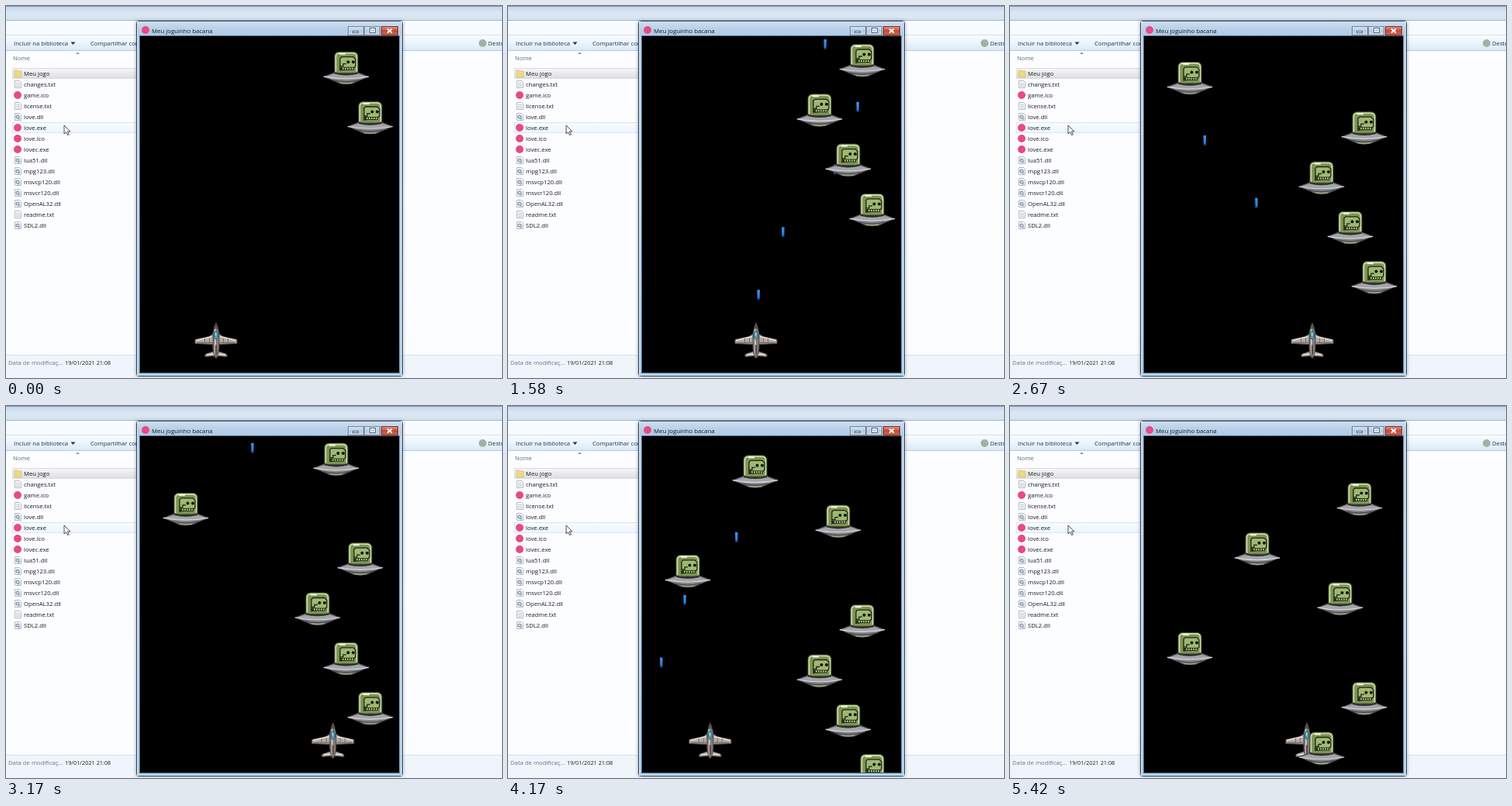
Animation of 640x480 px, one loop 5.51 s. Source, as an HTML page with a canvas:

```html
<!DOCTYPE html>
<html lang="pt">
<head>
<meta charset="utf-8">
<title>Meu joguinho bacana</title>
<style>
html, body { margin: 0; width: 100%; height: 100%; overflow: hidden; background: #fcfdff; }
canvas { display: block; }
</style>
</head>
<body>
<canvas id="stage" width="640" height="480"></canvas>
<script>
const c = document.getElementById('stage').getContext('2d');
const LOOP = 5510;
const PLANE_SPEED = .33, BULLET_SPEED = .4, SAUCER_SPEED = .08; // px per ms
const COOLDOWN = 202, SAUCER_GAP = 64.3;

// [time, x to steer for]
const STEER = [[0, 227], [133, 448], [989, 320], [1627, 210], [1960, 390], [2670, 440], [3115, 180], [3925, 383]];
// [time of first shot, shots]
const BURSTS = [[675, 5], [2075, 2], [3565, 5]];
const SAUCERS = [470, 439, 402, 457, 232, 426, 319, 451];
const FILES = ['Meu jogo', 'changes.txt', 'game.ico', 'license.txt', 'love.dll', 'love.exe', 'love.ico',
  'lovec.exe', 'lua51.dll', 'mpg123.dll', 'msvcp120.dll', 'msvcr120.dll', 'OpenAL32.dll', 'readme.txt', 'SDL2.dll'];

function planeX(t) {
  let x = 271;
  STEER.forEach(([start, goal], i) => {
    const end = Math.min(t, i + 1 < STEER.length ? STEER[i + 1][0] : LOOP);
    const reach = Math.max(0, end - start) * PLANE_SPEED;
    x += Math.max(-reach, Math.min(reach, goal - x));
  });
  return x;
}

function rect(x, y, w, h, fill) {
  c.fillStyle = fill;
  c.fillRect(x, y, w, h);
}

function frame(x, y, w, h, color) {
  c.strokeStyle = color;
  c.lineWidth = 1;
  c.strokeRect(x + .5, y + .5, w - 1, h - 1);
}

function fade(y0, y1, ...colors) {
  const g = c.createLinearGradient(0, y0, 0, y1);
  colors.forEach((color, i) => g.addColorStop(i / (colors.length - 1), color));
  return g;
}

function shape(path, fill, stroke, width = 1) {
  const p = new Path2D(path);
  if (fill) { c.fillStyle = fill; c.fill(p); }
  if (stroke) { c.strokeStyle = stroke; c.lineWidth = width; c.stroke(p); }
}

function dot(x, y, r, fill) {
  c.fillStyle = fill;
  c.beginPath();
  c.arc(x, y, r, 0, 7);
  c.fill();
}

function text(s, x, y, color = '#1c1c20', size = 7.7) {
  c.font = `${size}px "Open Sans", "Noto Sans", sans-serif`;
  c.fillStyle = color;
  c.fillText(s, x, y);
}

function place(x, y, draw) {
  c.save();
  c.translate(x, y);
  draw();
  c.restore();
}

function icon(name, y) {
  if (name === 'Meu jogo') {
    shape(`M11 ${y - 4}h4l1 1h4v8h-9z`, '#f0d783', '#d3b25c', .6);
  } else if (/ico$|exe$/.test(name)) {
    dot(15, y, 5, '#e74a84');
  } else {
    shape(`M11.5 ${y - 4.5}h6l2 2v7h-8z`, '#fcfdff', '#a3a8b2', .8);
    if (/txt$/.test(name)) {
      for (let i = -2; i < 4; i += 2) rect(13, y + i, 5, .8, '#b4bac4');
    } else {
      dot(15, y, 2.6, '#8498b0');
      dot(16.5, y + 2, 1.8, '#a4b0c0');
      dot(15, y, 1, '#fcfdff');
    }
  }
}

function explorer() {
  rect(0, 0, 640, 480, '#fcfdff');
  rect(0, 0, 640, 19, fade(0, 19, '#c4d6ea', '#dce8f5', '#d3e1f0'));
  rect(0, 0, 640, 1, '#8895a6');
  rect(0, 18, 640, 1, '#a3b3c6');
  rect(0, 19, 640, 19, '#f8fbff');
  rect(0, 37, 640, 1, '#d5e0ee');
  rect(0, 38, 640, 20, fade(38, 58, '#f9fcff', '#ebf3fc', '#dce8f6'));
  rect(0, 57, 640, 1, '#b8c9dd');
  text('Incluir na biblioteca', 10, 51, '#1e344e');
  shape('M83.5 46.5h6l-3 3.5z', '#1e344e');
  text('Compartilhar com', 109, 51, '#1e344e');
  dot(615, 48, 5, '#a5aea5');
  text('Destruir', 622, 51, '#1e344e');
  text('Nome', 9, 70, '#5a6a80');
  shape('M90 62l2.500-2.500 2.500 2.500z', '#8495a8');

  rect(8, 80, 162, 14, fade(80, 94, '#f8f8f8', '#eaeaec', '#dedee1'));
  frame(8, 80, 162, 14, '#dcdce0');
  rect(8, 150, 162, 14, fade(150, 164, '#f9fcff', '#ecf5fd'));
  frame(8, 150, 162, 14, '#d4e7f7');
  FILES.forEach((name, i) => {
    icon(name, 87 + 14 * i);
    text(name, 23, 89.5 + 14 * i);
  });
  rect(0, 450, 640, 30, '#f0f5fc');
  rect(0, 450, 640, 1, '#d6e1ef');
  text('Data de modificaç...', 3, 463, '#667488');
  text('19/01/2021 21:08', 76, 463, '#1c1c20', 7.3);
  shape('M75 154v11l2.6-2.4 1.900 4 1.800-.8-1.900-3.900h3.500z', '#fff', '#222', .8);
}

function gameWindow() {
  c.save();
  c.shadowColor = 'rgba(50,65,85,.5)';
  c.shadowBlur = 4;
  c.fillStyle = fade(19, 478, '#b8d0e9', '#bdd6ee', '#a5d0ec');
  c.beginPath();
  c.roundRect(168, 19, 344, 459, 3);
  c.fill();
  c.restore();
  rect(170, 21, 340, 17, fade(21, 38, '#ccddf0', '#b9d0e9', '#b0cae6'));
  c.strokeStyle = '#35404e';
  c.lineWidth = 1;
  c.beginPath();
  c.roundRect(168.5, 19.5, 343, 458, 3);
  c.stroke();
  frame(169, 20, 342, 457, '#d5eafa');
  frame(172, 38, 336, 436, '#52697f');
  dot(180, 31, 5, '#e74a84');
  text('Meu joguinho bacana', 188, 34.5, '#1c1c20', 7.8);

  [[441, 21], [462, 21], [484, 22]].forEach(([x, w], i) => {
    const colors = i < 2 ? ['#dce8f5', '#b6cae0', '#cadbec'] : ['#e4a296', '#c74632', '#d47250'];
    rect(x, 26, w, 12, fade(26, 38, ...colors));
    frame(x, 26, w, 12, i < 2 ? '#72869e' : '#70332f');
  });
  rect(447, 32, 8, 3, '#fff');
  frame(447, 32, 8, 3, '#566273');
  frame(469, 28, 8, 7, '#566273');
  frame(470, 29, 6, 5, '#fff');
  shape('M492 29.5l6 5m0-5l-6 5', null, '#fff', 1.8);
  rect(173, 39, 334, 434, '#000');
}

function plane() {
  shape('M-3 14L-9 18L-27 22V27L-4 28L-3 37L-14 41V44L-3 43L0 46L3 43L14 44V41L3 37L4 28L27 27V22L9 18L3 14z',
    '#b3aaa4', '#57504e');
  shape('M-5 18L-26 23M5 18L26 23M-12 41h24', null, '#eae1d6', 1.6);
  shape('M-25 26L-5 26M25 26L5 26', null, '#77706e', 1.5);
  for (const x of [-15, -9, 9, 15]) rect(x, 20, .8, 6, '#68615f');
  shape('M0 0L2 5L4 13V34L2 44H-2L-4 34V13L-2 5z', '#827975', '#39363a', .8);
  rect(-2, 8, 2, 33, '#cdc4ba');
  shape('M0 1L2 8H-2z', '#49513f');
  shape('M0 10L2.5 14V20L0 22L-2.5 20V14z', '#4299bb', '#304c5b', .7);
  rect(-1, 13, 1.5, 4, '#a5dcec');
  rect(-1, 29, 2, 12, '#524b4c');
}

function bullet() {
  rect(-1.5, -7, 3.5, 13, fade(-7, 7, '#379bf0', '#1c6bc8', '#08264e'));
  rect(-.5, -5, 1.5, 9, '#3b91e4');
}

function saucer() {
  // dome
  shape('M-15 28V5Q-14 .5-9 .5H9Q14 .5 15 5V28z', '#7f9454', '#3e4b2b');
  shape('M-13.5 26V6Q-13 2-8 2H8Q13 2 13.5 6V26', null, '#cfdfb2', 1.6);
  rect(-9, 2, 8, 2, '#f3f8e6');
  // pilot
  shape('M-8 24V9L-6 7H9L12 10V19L9 22z', '#9fb873', '#1d2614', 1.3);
  shape('M-8 19H-4V16H0', null, '#1d2614', 1.3);
  for (const x of [2.5, 9]) dot(x, 13.5, 2, '#10150c');
  rect(-8, 20, 18, 4, '#26311b');
  for (let x = -5; x < 9; x += 3) rect(x, 21, 2, 2, '#a9c084');
  // disc
  shape('M-15 27L-29.5 32.500L-18 37L-9 41Q0 43 9 41L18 37L29.5 32.500L15 27Q0 31-15 27z', '#85858b', '#39393f');
  shape('M-27 32.500Q0 38 27 32.500L15 29Q0 32-15 29z', '#a4a4aa');
  shape('M-29 32.5Q0 38 29 32.5', null, '#d8d8dc', 1.2);
  shape('M-15 28Q0 32 15 28', null, '#262c20', 1.6);
  shape('M-17 37Q0 41 17 37', null, '#4b4b51', 1.4);
  shape('M-8 40.5Q0 42 8 40.500', null, '#93a970', 1.4);
}

function draw(now) {
  // The picture advances twelve times a second.
  const t = now % LOOP;
  const start = k => Math.round(k * 25 / 3) * 10;
  let step = Math.min(65, Math.round(t * 3 / 250));
  if (start(step) > t) step--;
  const time = start(step);

  explorer();
  gameWindow();

  c.save();
  c.beginPath();
  c.rect(173, 39, 334, 434);
  c.clip();
  for (const [first, shots] of BURSTS) {
    for (let i = 0; i < shots; i++) {
      const fired = first + i * COOLDOWN;
      if (time >= fired) place(planeX(fired) + 3, 412 - BULLET_SPEED * (time - fired), bullet);
    }
  }
  place(planeX(time), 408.5, plane);
  const lead = Math.max(123, 115.5 + SAUCER_SPEED * time);
  SAUCERS.forEach((x, i) => {
    const y = lead - SAUCER_GAP * i;
    if (y > 42) place(x, y, saucer);
  });
  c.restore();
}

const begin = performance.now();
function tick() {
  draw(performance.now() - begin);
  requestAnimationFrame(tick);
}
tick();
</script>
</body>
</html>
```
